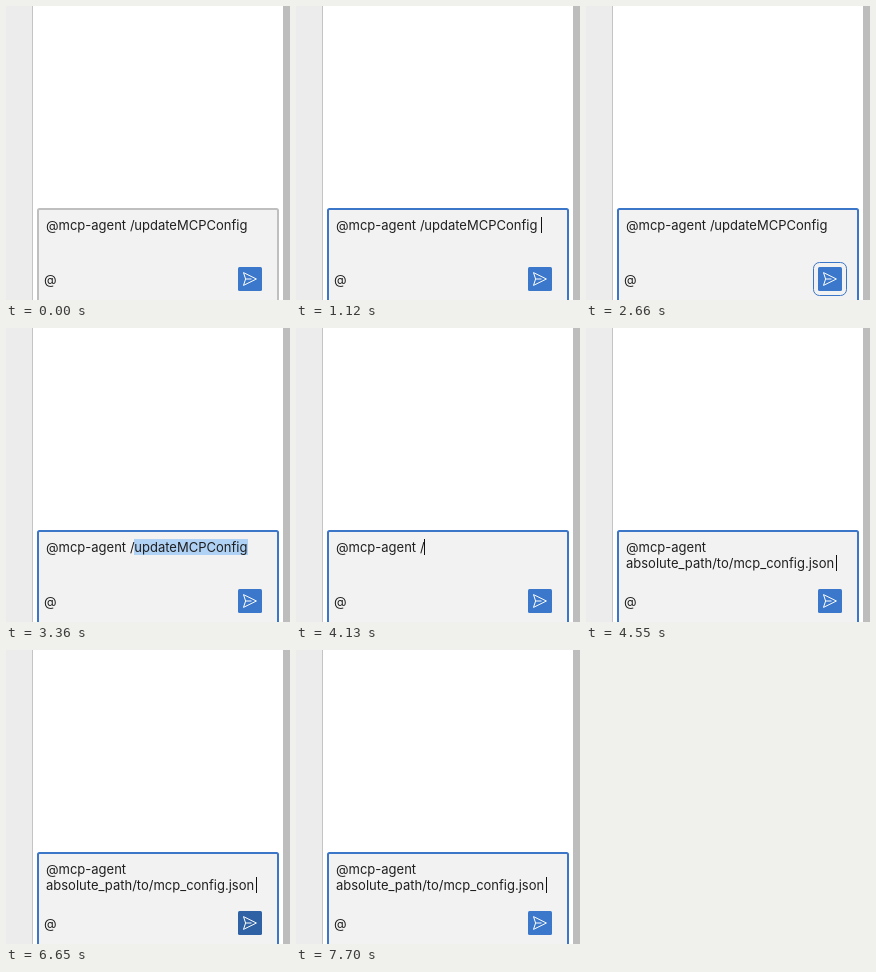
These frames come from a looping animation (284 by 294 pixels, 7910 ms). An HTML page:

```html
<!DOCTYPE html>
<html lang="en">
<head>
<meta charset="utf-8">
<title>Chat input</title>
<style>
  html, body { margin: 0; width: 100%; height: 100%; overflow: hidden; background: #fff; }
  svg { display: block; }
  text { font: 13px Inter, "Open Sans", sans-serif; fill: #1f1f1f; white-space: pre; }
  .caret { fill: #111; }
</style>
</head>
<body>
<svg width="284" height="294" viewBox="0 0 284 294">
  <rect width="284" height="294" fill="#fff"/>
  <rect width="26" height="294" fill="#ececec"/>
  <rect x="26" width="1" height="294" fill="#c4c4c4"/>
  <rect x="277" width="7" height="294" fill="#bdbdbd"/>

  <rect id="field" x="32" y="203" width="240" height="110" rx="1.5" fill="#f2f2f2" stroke="#bfbfbf" stroke-width="2"/>
  <rect id="selection" x="128" y="211" width="114" height="16" fill="#b0d2f5"/>

  <text x="40" y="224">@mcp-agent</text>
  <text id="slash" x="124" y="224">/</text>
  <text id="command" x="128.3" y="224">updateMCPConfig</text>
  <text id="path" x="40" y="240">absolute_path/to/mcp_config.json</text>
  <text x="38" y="278">@</text>

  <rect id="caretEnd" class="caret" x="245" y="211" width="1" height="16"/>
  <rect id="caretWord" class="caret" x="192" y="211" width="1" height="16"/>
  <rect id="caretSlash" class="caret" x="128" y="211" width="1" height="16"/>
  <rect id="caretPath" class="caret" x="250" y="227" width="1" height="16"/>

  <rect id="ring" x="227.5" y="256.5" width="33" height="33" rx="6" fill="none" stroke="#3b76c8"/>
  <rect id="button" x="232" y="261" width="24" height="24" rx="1.5" fill="#3b78cb"/>
  <path transform="translate(236 265)" d="M1.5 1.6 14.4 8 1.5 14.4 3.6 8ZM3.6 8H9.5"
        fill="none" stroke="#fff" stroke-linejoin="round"/>
</svg>
<script>
  const LOOP = 7910;

  // Holds each value until the next [time, value] step.
  function play(id, property, steps) {
    const frames = steps.map(([time, value]) => ({
      offset: time / LOOP, [property]: value, easing: 'step-end'
    }));
    frames.push({ ...frames[frames.length - 1], offset: 1 });
    document.getElementById(id).animate(frames, { duration: LOOP, iterations: Infinity });
  }

  // Visible only during the listed [from, to] spans.
  function show(id, ...spans) {
    const steps = spans[0][0] > 0 ? [[0, 0]] : [];
    for (const [from, to] of spans) {
      steps.push([from, 1]);
      if (to < LOOP) steps.push([to, 0]);
    }
    play(id, 'opacity', steps);
  }

  const BLUE = '#3b78cb', HOVER = '#2f62a4';

  play('field', 'stroke', [[0, '#bfbfbf'], [1120, '#3b76c8']]);
  play('button', 'fill', [[0, BLUE], [1820, HOVER], [2660, BLUE], [6090, HOVER], [7140, BLUE]]);
  show('ring', [1680, 3220]);
  show('selection', [3360, 4130]);
  show('command', [0, 4130]);
  show('slash', [0, 4550]);
  show('path', [4550, LOOP]);
  show('caretEnd', [1120, 1680]);
  show('caretWord', [3220, 3360]);
  show('caretSlash', [4130, 4270]);
  show('caretPath', [4550, 5040], [5600, 6090], [6650, 7140], [7700, LOOP]);
</script>
</body>
</html>
```
